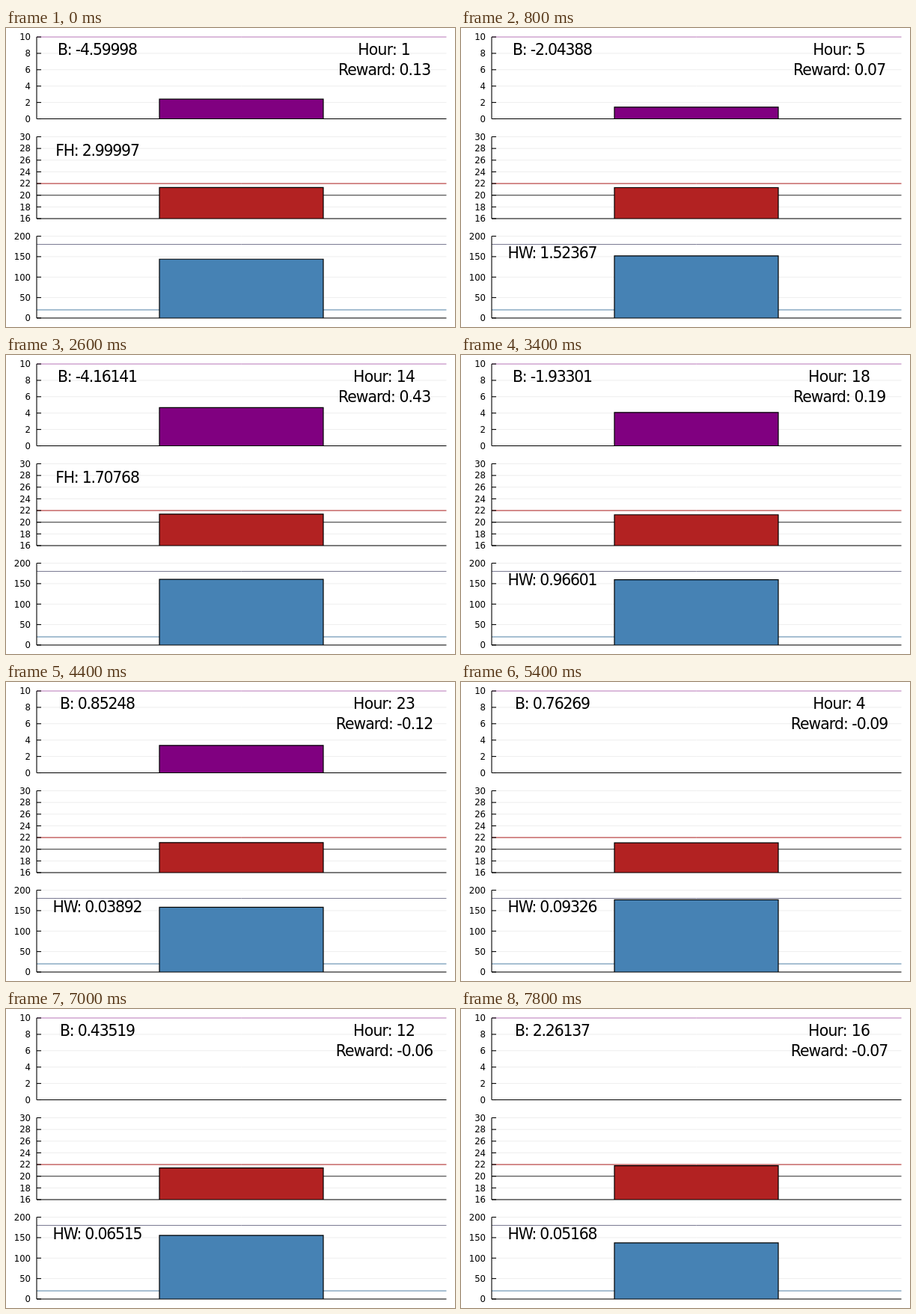
An HTML page with a canvas that plays this animation: 600 by 400 pixels, repeating every 8 s.

```html
<!DOCTYPE html>
<html lang="en">
<head>
<meta charset="utf-8">
<style>
  html, body { margin: 0; width: 100%; height: 100%; overflow: hidden; background: #fff; }
  canvas { display: block; }
</style>
</head>
<body>
<canvas id="stage" width="600" height="400"></canvas>
<script>
const ctx = document.getElementById('stage').getContext('2d');
const STEP_MS = 200, STEPS = 40;
const LEFT = 41, RIGHT = 588.5, BAR_LEFT = 205, BAR_RIGHT = 424;

const panels = [
  { key: 'battery', top: 12, bottom: 121.5, min: 0, max: 10, tick: 2, fill: '#800080',
    limits: [[10, '#c07fc0']] },
  { key: 'floor', top: 145.5, bottom: 255, min: 16, max: 30, tick: 2, fill: '#b22222',
    limits: [[22, '#b22222'], [20, '#333']] },
  { key: 'water', top: 278.5, bottom: 388, min: 0, max: 200, tick: 50, fill: '#4682b4',
    limits: [[180, '#777790'], [20, '#4f7fa5']] }
];

// Readings at known steps; the steps between are interpolated.
const readings = [
  { step: 0, power: -4.59998, reward: 0.13, battery: 2.4, floor: 21.33, water: 143.8, heat: 2.99997 },
  { step: 8, power: 0.51222, reward: 0, battery: 0.47, floor: 21.28, water: 159.8, heat: 0.04737 },
  { step: 13, power: -4.16141, reward: 0.43, battery: 4.66, floor: 21.38, water: 160.6, heat: 1.70768 },
  { step: 22, power: 0.85248, reward: -0.12, battery: 3.35, floor: 21.14, water: 158.3, heat: 0.03892 },
  { step: 27, power: 0.76269, reward: -0.09, battery: 0, floor: 21.1, water: 176.6, heat: 0.09326 },
  { step: 31, power: -1.38976, reward: -0.05, battery: 0, floor: 21.09, water: 169.7, heat: 0.07612 },
  { step: 36, power: 0.89143, reward: -0.06, battery: 0, floor: 21.5, water: 152, heat: 0.06241 },
  { step: 39, power: 2.26137, reward: -0.07, battery: 0, floor: 21.8, water: 137.2, heat: 0.05168 }
];

function readingAt(step) {
  const next = Math.max(1, readings.findIndex(r => r.step >= step));
  const a = readings[next - 1], b = readings[next];
  const f = (step - a.step) / (b.step - a.step);
  return Object.fromEntries(Object.keys(a).map(k => [k, a[k] * (1 - f) + b[k] * f]));
}

function decimal(value, digits) {
  const text = String(Number(value.toFixed(digits)) || 0);
  return text.includes('.') ? text : text + '.0';
}

function line(x1, y1, x2, y2, color, width = 1) {
  ctx.strokeStyle = color;
  ctx.lineWidth = width;
  ctx.beginPath();
  ctx.moveTo(x1, y1);
  ctx.lineTo(x2, y2);
  ctx.stroke();
}

function label(text, x, y, spacing) {
  ctx.font = '20.4px "DejaVu Sans", sans-serif';
  ctx.letterSpacing = spacing + 'px';
  ctx.textAlign = 'center';
  ctx.fillText(text, x + spacing / 2, y);
  ctx.letterSpacing = '0px';
}

function drawPanel(p, value) {
  const yOf = v => p.bottom - (v - p.min) / (p.max - p.min) * (p.bottom - p.top);
  const ticks = [];
  for (let v = p.min; v <= p.max; v += p.tick) ticks.push(v);

  ticks.forEach(v => line(LEFT, yOf(v), RIGHT, yOf(v), '#eee'));
  p.limits.forEach(([v, color]) => line(LEFT, yOf(v), RIGHT, yOf(v), color));

  if (value > p.min) {
    const y = yOf(value);
    ctx.fillStyle = p.fill;
    ctx.fillRect(BAR_LEFT, y, BAR_RIGHT - BAR_LEFT, p.bottom - y);
    ctx.strokeStyle = '#000';
    ctx.lineWidth = 1.2;
    ctx.beginPath();
    ctx.moveTo(BAR_LEFT, p.bottom);
    ctx.lineTo(BAR_LEFT, y);
    ctx.lineTo(BAR_RIGHT, y);
    ctx.lineTo(BAR_RIGHT, p.bottom);
    ctx.stroke();
  }

  line(LEFT, p.top, LEFT, p.bottom, '#000', 1.1);
  line(LEFT, p.bottom, RIGHT, p.bottom, '#000', 1.1);
  ctx.fillStyle = '#000';
  ctx.font = '11.7px "DejaVu Sans", sans-serif';
  ctx.textAlign = 'right';
  ticks.forEach(v => {
    line(LEFT, yOf(v), LEFT + 6, yOf(v), '#000', 1.1);
    ctx.fillText(v, 33, yOf(v) + 4.3);
  });
}

function draw(now) {
  const step = Math.floor(now / STEP_MS) % STEPS;
  const r = readingAt(step);
  ctx.fillStyle = '#fff';
  ctx.fillRect(0, 0, 600, 400);
  panels.forEach(p => drawPanel(p, r[p.key]));

  ctx.fillStyle = '#000';
  label('B: ' + decimal(r.power, 5), 122.5, 35.5, -1.2);
  label('Hour: ' + (step % 24 + 1), 505.5, 35.5, -0.75);
  label('Reward: ' + decimal(r.reward, 2), 506, 63, -0.95);
  const floorHeating = step < 2 || (step > 11 && step < 15);
  if (floorHeating) label('FH: ' + decimal(r.heat, 5), 122.5, 171, -1.2);
  else label('HW: ' + decimal(r.heat, 5), 122.5, 307.5, -1.2);
}

const start = performance.now();
(function frame() {
  draw(performance.now() - start);
  requestAnimationFrame(frame);
})();
</script>
</body>
</html>
```
